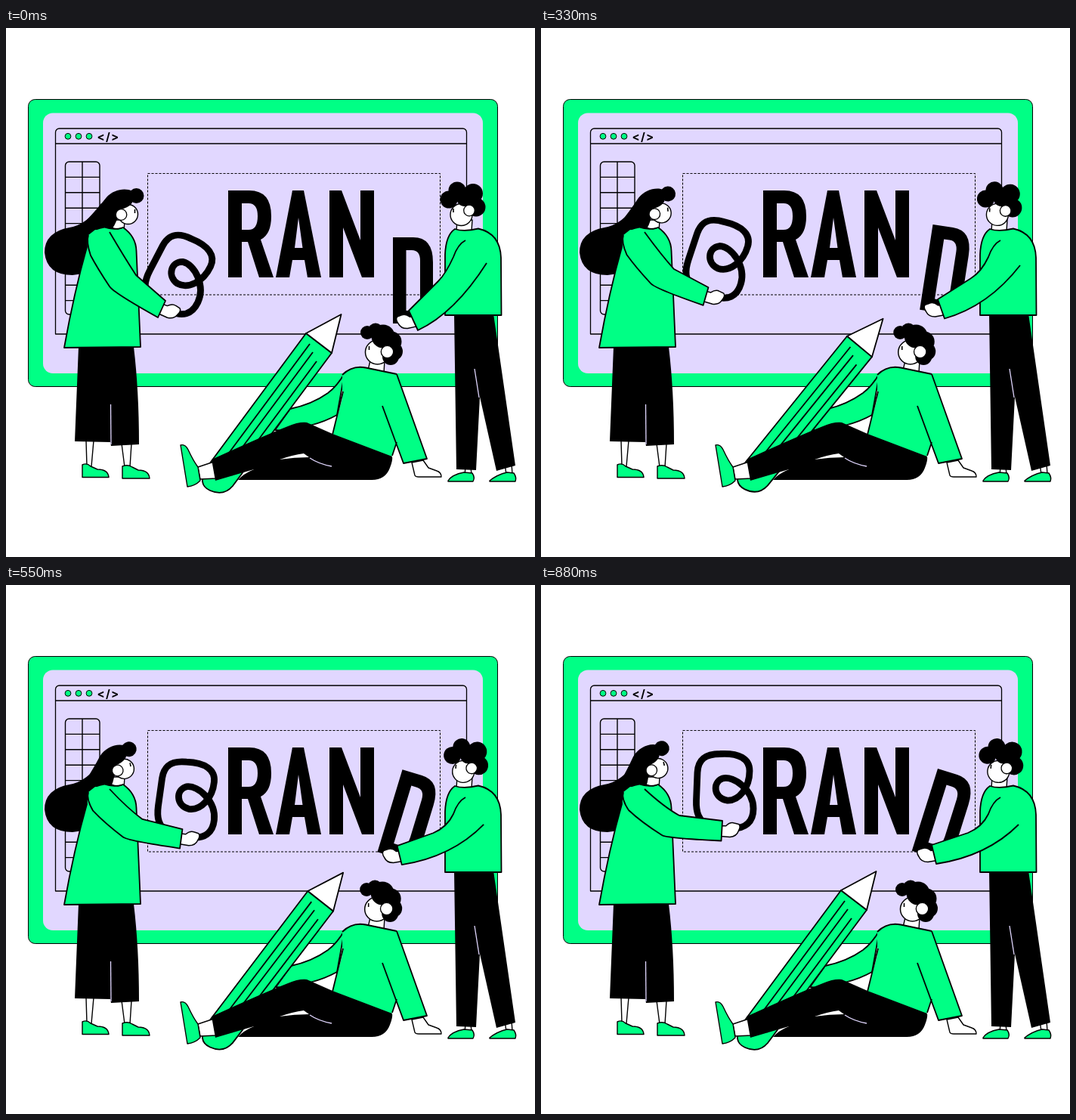
Recreate the animation shown at these times as an HTML page with a canvas. Size 700 by 700 pixels, loop 990 ms.

```html
<!DOCTYPE html>
<html lang="en">
<head>
<meta charset="utf-8">
<title>Brand design team</title>
<style>
  html, body { margin: 0; width: 100%; height: 100%; overflow: hidden; background: #fff; }
  canvas { display: block; width: 700px; height: 700px; }
</style>
</head>
<body>
<canvas id="stage" width="700" height="700"></canvas>
<script>
const ctx = document.getElementById('stage').getContext('2d');
const GREEN = '#00ff85', LILAC = '#e1d7ff', INK = '#000', WHITE = '#fff';
const STEP = 110, STEPS = 9;

const mix = (a, b, t) => a + (b - a) * t;
const clamp = v => Math.max(0, Math.min(1, v));

// Fill and/or stroke an SVG path string.
function shape(d, fill, line = 1.8, color = INK) {
  const p = new Path2D(d);
  if (fill) { ctx.fillStyle = fill; ctx.fill(p, 'evenodd'); }
  if (line) { ctx.strokeStyle = color; ctx.lineWidth = line; ctx.stroke(p); }
}

function disc(x, y, r, fill, line = 0) {
  ctx.beginPath();
  ctx.arc(x, y, r, 0, Math.PI * 2);
  ctx.fillStyle = fill;
  ctx.fill();
  if (line) { ctx.strokeStyle = INK; ctx.lineWidth = line; ctx.stroke(); }
}

function box(x, y, w, h, r, fill, line) {
  ctx.beginPath();
  ctx.roundRect(x, y, w, h, r);
  if (fill) { ctx.fillStyle = fill; ctx.fill(); }
  if (line) { ctx.strokeStyle = INK; ctx.lineWidth = line; ctx.stroke(); }
}

// Draw with a rotation about (x, y).
function turned(x, y, angle, draw) {
  ctx.save();
  ctx.translate(x, y);
  ctx.rotate(angle);
  ctx.translate(-x, -y);
  draw();
  ctx.restore();
}

// Draw in a local frame placed at (x, y).
function placed(x, y, angle, flip, draw) {
  ctx.save();
  ctx.translate(x, y);
  ctx.rotate(angle);
  ctx.scale(flip, 1);
  draw();
  ctx.restore();
}

const hand = () =>
  shape('M-2 -7L6 -6Q12 -11 17 -9L23 -7Q26 -4 22 2Q19 9 10 9L-2 7Z', WHITE, 1.5);

function board() {
  box(29.5, 94.5, 621, 380, 9, GREEN, 1);
  box(49, 112.5, 582, 344.5, 13, LILAC);
  box(65.5, 133, 544, 272, [5, 5, 0, 0], null, 1.3);
  shape('M65.5 153H609.5', null, 1.3);
  for (const x of [82, 96, 110]) disc(x, 143.3, 3.9, GREEN, 1);
  ctx.fillStyle = INK;
  ctx.font = 'bold 15px Inter, sans-serif';
  ctx.letterSpacing = '1.2px';
  ctx.fillText('</>', 120.5, 148.5);

  box(78.5, 177, 45.5, 202, 5, null, 1.4);
  shape('M101 177V379', null, 1.4);
  for (let i = 1; i < 10; i++) shape(`M78.5 ${177 + i * 20.4}H124`, null, 1.4);

  ctx.setLineDash([3, 2]);
  shape('M187.5 192.5H574.5V353H187.5Z', null, 1);
  ctx.setLineDash([]);
}

function lettering() {
  shape('M294 215H322Q351 215 351 249Q351 273 337 280L354 330H335L320 283H312V330H294Z' +
        'M312 232V267H321Q333 267 333 249Q333 232 321 232Z', INK, 0);
  shape('M357 330L379 215H394L417 330H399L395 307H379L375 330Z' +
        'M382 291H392.5L387 251Z', INK, 0);
  shape('M428 215H444L469 281V215H487V330H471L446 264V330H428Z', INK, 0);
}

function curlyB(p) {
  placed(mix(213, 250, p), mix(377, 326, p), mix(0.44, 0, p), 1, () => {
    ctx.translate(-250, -326);
    shape('M222 318C208 312 205 300 205.5 285L207 248C208 230 218 223.5 237 223.5' +
          'C262 222 276 230 276 246C276 268 262 286 246 285C229 282 226 262 240 256' +
          'C256 252 281 272 281 296C281 314 270 322 254 322', null, 8.8);
  });
}

function letterD(q) {
  placed(mix(512, 525, q), mix(277, 243, q), mix(0, 0.305, q), 1, () =>
    shape('M0 0H27Q53 0 53 33V81Q53 114 27 114H0Z' +
          'M17.5 17V97H25Q36 97 36 83V31Q36 17 25 17Z', INK, 0));
}

function woman(p) {
  // feet and trousers
  shape('M106 546L107 580H113L116 546Z', WHITE, 1.4);
  shape('M153 550L157 581H164L166 550Z', WHITE, 1.4);
  shape('M101 578Q107 575 112 580L121 584Q135 584 136 594.5L101 594.5Z', GREEN, 1.4);
  shape('M154 580Q161 577 167 581L175 585Q189 585 190 596L154 596Z', GREEN, 1.4);
  shape('M96 422L91 547L138 548L139 553L176 551Q176 480 169 422Z', INK, 0);
  shape('M138.5 498L139 551', null, 1.3, LILAC);

  // hair, neck and head
  shape('M126 232Q108 260 84 264Q51 270 51 297Q54 327 88 327L102 325L112 280L142 262L146 238Z', INK, 0);
  shape('M140 254L139 268L156 269L157 254Z', WHITE, 1.4);
  turned(142, 272, -0.24 * p, () => {
    disc(161.5, 246.5, 13, WHITE, 1.4);
    shape('M167 216C158 211 142 214 133 224Q122 238 106 255L104 275L139 268' +
          'Q149 254 150 240C158 239 164 236 167 231Z', INK, 0);
    disc(172.5, 222, 10, INK);
    disc(152.5, 247, 7.3, WHITE, 1.3);
    shape('M170.5 240V245', null, 1.6);
  });

  // coat
  shape('M130 263.5Q142 268 155 264Q172 276 172.5 295L178 422L77 423Q90 350 107 290Q105 267 130 263.5Z', GREEN);
  shape('M139 264Q149 268 155 264', null, 1.4);

  // arm, swinging up from the shoulder
  const tx = mix(211, 240, p), ty = mix(361, 312, p);
  const bx = mix(201, 238.5, p), by = mix(383, 338.5, p);
  placed((tx + bx) / 2, (ty + by) / 2, mix(0.25, -0.08, p), 1, hand);
  const lower = `M109 274Q106 283 ${mix(112, 116, p)} ${mix(301, 298, p)}` +
    `Q${mix(121, 133, p)} ${mix(318, 314, p)} ${mix(137, 160, p)} ${mix(342, 331, p)}` +
    `Q${mix(142, 165, p)} ${mix(350, 335, p)} ${bx} ${by}`;
  const upper = `L${tx} ${ty}L${mix(172, 183, p)} ${mix(327, 305, p)}` +
    `Q${mix(157, 163, p)} ${mix(304, 294, p)} 137 270`;
  shape(lower + upper + 'L118 267Z', GREEN, 0);
  shape(lower + upper, null);
}

function man(q) {
  shape('M608 580L607 592H616L615 580Z', WHITE, 1.4);
  shape('M660 576L662 591H670L669 576Z', WHITE, 1.4);
  shape('M585 599Q590 591 606 588L617 589Q621 595 618 600L585 600Z', GREEN, 1.4);
  shape('M640 599Q650 591 663 588L672 589Q676 595 674 600L640 600Z', GREEN, 1.4);
  shape('M593 378L596 584L622 585L627 488L649 586L674 579L645 378Z', INK, 0);
  shape('M620 451L626 489', null, 1.3, LILAC);

  shape('M597 254L596 269H616L617 254Z', WHITE, 1.4);
  turned(605, 275, 0.1 * q, () => {
    disc(602.5, 247, 14.5, WHITE, 1.4);
    for (const [x, y, r] of [[597, 215, 11.5], [618, 219, 13], [586, 227, 11.5],
                             [622, 237, 12.5], [607, 225, 11]]) disc(x, y, r, INK);
    disc(613, 241.5, 7.3, WHITE, 1.3);
    shape('M592 239V244', null, 1.6);
  });

  shape('M594 266Q606 270 625 265.5Q654 272 655 304L655.5 380H581V300Q582 274 594 266Z', GREEN);

  const tx = mix(533, 517, q), ty = mix(374, 344, q);
  const bx = mix(545, 523, q), by = mix(400, 369, q);
  placed((tx + bx) / 2 + 2, (ty + by) / 2 + 1, mix(-0.05, 0, q), -1, hand);
  const arm = `M608 281Q598 286 592 303Q${mix(582, 584, q)} ${mix(325, 320, q)} ` +
    `${mix(572, 565, q)} ${mix(335, 328, q)}L${tx} ${ty}L${bx} ${by}` +
    `Q${mix(594, 590, q)} ${mix(377, 359, q)} ${mix(636, 632, q)} ${mix(311, 317, q)}`;
  shape(arm, GREEN, 0);
  shape(arm, null);
}

function pencil(b) {
  turned(310, 600, 0.045 * b, () => {
    shape('M397 404L266 581Q252 604 270 612Q288 620 300 606L431 430Z', GREEN);
    for (const [x, y] of [[402, 418], [406, 429], [411, 441]])
      shape(`M${x} ${y}L${x - 112} ${y + 151}`, null, 1.8);
    shape('M397 404L443.5 379L431 430Z', WHITE);
  });
}

function sitter(b) {
  // arm behind the pencil
  const s = 4 * b;
  shape(`M448 457Q438 474 426 483Q405 498 ${376 + s} 504L${356 + s} 532` +
        `Q${376 + s} 535 402 526Q422 521 438 512Z`, GREEN);
  pencil(b);

  shape('M482 440L479 453L500 456L501 440Z', WHITE, 1.4);
  ctx.save();
  ctx.translate(-3 * b, 0);
  disc(491.5, 429, 16, WHITE, 1.5);
  for (const [x, y, r] of [[478, 403, 9], [489, 400, 9.5], [499, 408, 15.5],
                           [510, 415, 13.5], [513, 428, 12], [509, 435, 11]]) disc(x, y, r, INK);
  disc(504.5, 428.5, 8.2, WHITE, 1.3);
  shape('M480.5 421V426', null, 1.6);
  ctx.restore();

  // planted hand
  shape('M537 575L541 592Q542 594 546 594H576Q576 588 570 586L559 582L552 572Z', WHITE, 1.4);

  // sweater: torso first, then the near arm
  shape('M445 459Q458 446 476 449.5L517 458L519 540L510 568L432 538L445 490Z', GREEN, 0);
  shape('M446 481L432 538M445 459Q458 446 476 449.5L517 458', null);
  shape('M498 500L517 458L557 570L526 576Z', GREEN, 0);
  shape('M517 458L557 570L526 576L498 500M511 566L517 548', null);

  // foot and trousers
  shape('M275 574L254 581L257 597L279 596Z', WHITE, 1.4);
  shape('M231 552Q237 550 241 558Q248 573 254 581L257 599Q250 606 240 607Z', GREEN, 1.4);
  shape('M398 522L432 537L511 567Q512 572 508 582Q502 598 484 598H307Q314 590 328 584' +
        'L277 599L272 571Q340 540 373 527Q387 521 398 522Z', INK, 0);
  shape('M362 571Q379 565 394 563L401 568Q382 568 362 571Z', WHITE, 0);
  shape('M402 569Q414 577 431 580', null, 1.3, LILAC);
}

function frame(now) {
  const k = Math.floor(now / STEP) % STEPS;
  const p = (1 - Math.cos(Math.PI * clamp(k / 7.3))) / 2;
  const u = clamp(k / 6);
  const q = u * u * u * (u * (u * 6 - 15) + 10);
  const b = Math.exp(-(((k - 3.4) / 1.4) ** 2));

  ctx.fillStyle = WHITE;
  ctx.fillRect(0, 0, 700, 700);
  ctx.lineJoin = 'round';
  board();
  lettering();
  curlyB(p);
  letterD(q);
  woman(p);
  man(q);
  sitter(b);
}

const start = performance.now();
function tick() {
  frame(performance.now() - start);
  requestAnimationFrame(tick);
}
tick();
</script>
</body>
</html>
```
